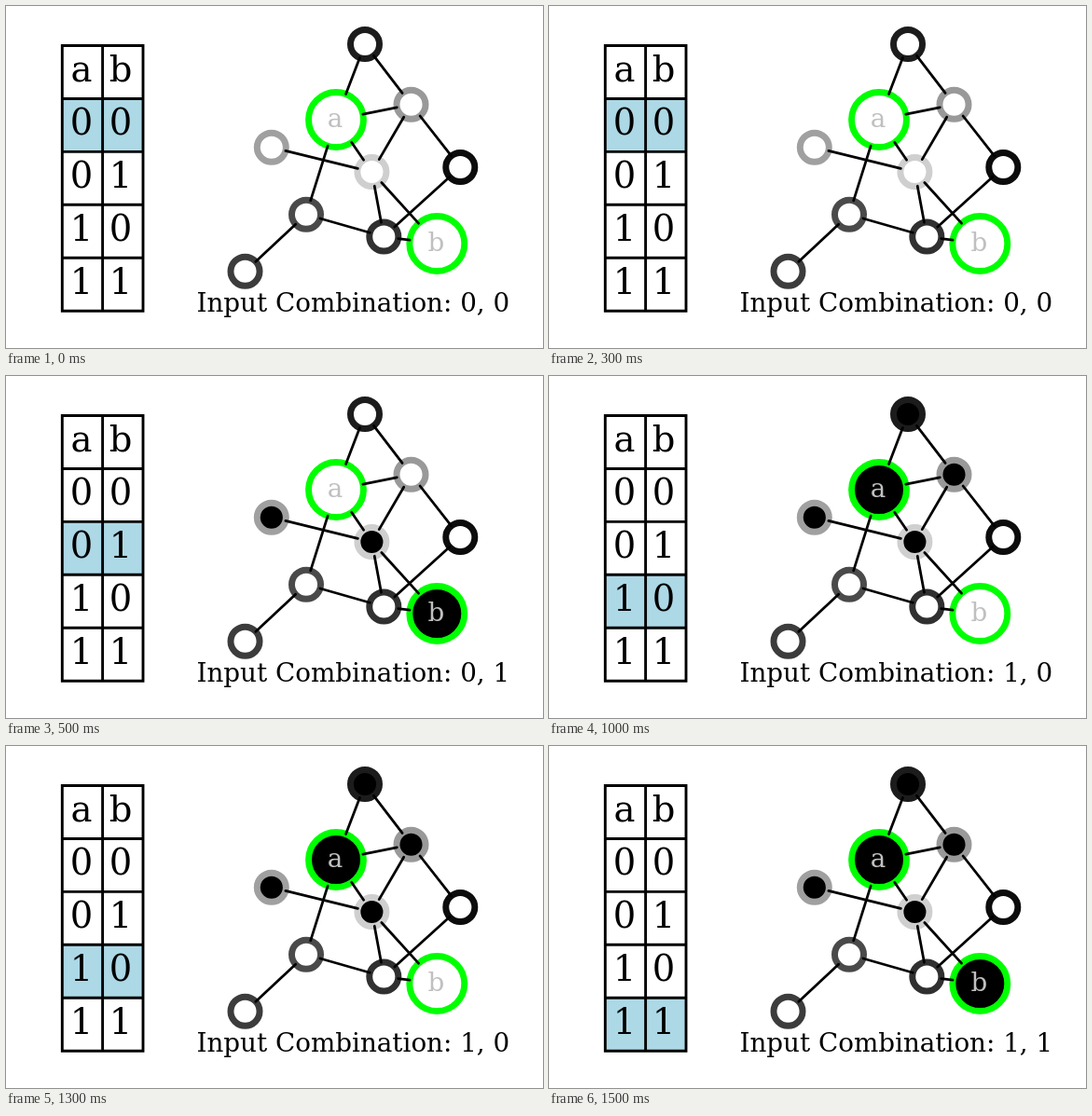
An HTML page that plays this animation: 576x367 px, repeating every 2 s.

```html
<!DOCTYPE html>
<html lang="en">
<head>
<meta charset="utf-8">
<title>Input combinations</title>
<style>
  html, body { margin: 0; width: 100%; height: 100%; overflow: hidden; background: #fff; }
  svg { display: block; width: 576px; height: 367px; }
  text { font-family: "DejaVu Serif", "Noto Serif", serif; }
  .cell { font-size: 38.5px; text-anchor: middle; }
  .label { font-size: 27.78px; text-anchor: middle; fill: #c0c0c0; }
  .caption { font-size: 27.78px; visibility: hidden; animation: show 2s step-end infinite; }
  .row { fill: #add8e6; animation: descend 2s steps(4) infinite; }
  .grid { fill: none; stroke: #000; stroke-width: 2.9; }
  .edges { stroke: #000; stroke-width: 2.78; stroke-linecap: round; }
  .node { fill: #fff; stroke-width: 6.94; }
  .on-a { animation: on-a 2s step-end infinite; }
  .on-b { animation: on-b 2s step-end infinite; }
  .on-or { animation: on-or 2s step-end infinite; }
  @keyframes descend { to { transform: translateY(228px); } }
  @keyframes show { 0% { visibility: visible; } 25%, 100% { visibility: hidden; } }
  @keyframes on-a { 0% { fill: #fff; } 50%, 100% { fill: #000; } }
  @keyframes on-b { 0%, 50% { fill: #fff; } 25%, 75%, 100% { fill: #000; } }
  @keyframes on-or { 0% { fill: #fff; } 25%, 100% { fill: #000; } }
</style>
</head>
<body>
<svg id="stage" viewBox="0 0 576 367">
  <rect class="row" x="60" y="99.5" width="87" height="57"/>
  <path class="grid" d="M60.3 42.5H147V327.2H60.3ZM103.6 42.5V327.2M60.3 99.5H147M60.3 156.4H147M60.3 213.3H147M60.3 270.3H147"/>
</svg>
<script>
  const stage = document.getElementById("stage");

  function add(tag, attrs, parent = stage, text = "") {
    const el = document.createElementNS(stage.namespaceURI, tag);
    for (const key in attrs) el.setAttribute(key, attrs[key]);
    el.textContent = text;
    return parent.appendChild(el);
  }

  const SMALL = 15.53, BIG = 29.46;
  const node = (x, y, stroke, on = "", r = SMALL) => ({ x, y, stroke, on, r });
  const nodes = {
    a: node(354, 122, "#0f0", "on-a", BIG),
    b: node(462.3, 255, "#0f0", "on-b", BIG),
    top: node(385, 41, "#1c1c1c", "on-a"),
    upper: node(434.5, 105.8, "#999", "on-a"),
    left: node(284.8, 151.8, "#a0a0a0", "on-or"),
    hub: node(392.4, 178, "#cfcfcf", "on-or"),
    right: node(487.3, 173, "#0c0c0c"),
    mid: node(322, 223.7, "#4a4a4a"),
    low: node(405.3, 247.5, "#303030"),
    tail: node(256.5, 284.8, "#3c3c3c")
  };
  const links = "top-a top-upper a-upper a-hub a-mid upper-hub upper-right " +
    "left-hub hub-low hub-b mid-low low-right low-b mid-tail";

  for (const n of Object.values(nodes))
    add("circle", { class: "node " + n.on, cx: n.x, cy: n.y, r: n.r, stroke: n.stroke });

  // Each edge runs between the two outlines, not the centres.
  const edges = add("g", { class: "edges" });
  for (const link of links.split(" ")) {
    const [p, q] = link.split("-").map(name => nodes[name]);
    const d = Math.hypot(q.x - p.x, q.y - p.y);
    const ux = (q.x - p.x) / d, uy = (q.y - p.y) / d;
    add("line", {
      x1: p.x + ux * p.r, y1: p.y + uy * p.r,
      x2: q.x - ux * q.r, y2: q.y - uy * q.r
    }, edges);
  }

  add("text", { class: "label", x: 353, y: 130 }, stage, "a");
  add("text", { class: "label", x: 461.3, y: 262.5 }, stage, "b");

  ["ab", "00", "01", "10", "11"].forEach((pair, i) => {
    const y = 81.3 + i * 56.8;
    add("text", { class: "cell", x: 81, y }, stage, pair[0]);
    add("text", { class: "cell", x: 123, y }, stage, pair[1]);
    if (i) add("text", {
      class: "caption", x: 204.5, y: 328,
      style: `animation-delay: ${(i - 1) * 500 - 2000}ms`
    }, stage, `Input Combination: ${pair[0]}, ${pair[1]}`);
  });
</script>
</body>
</html>
```
